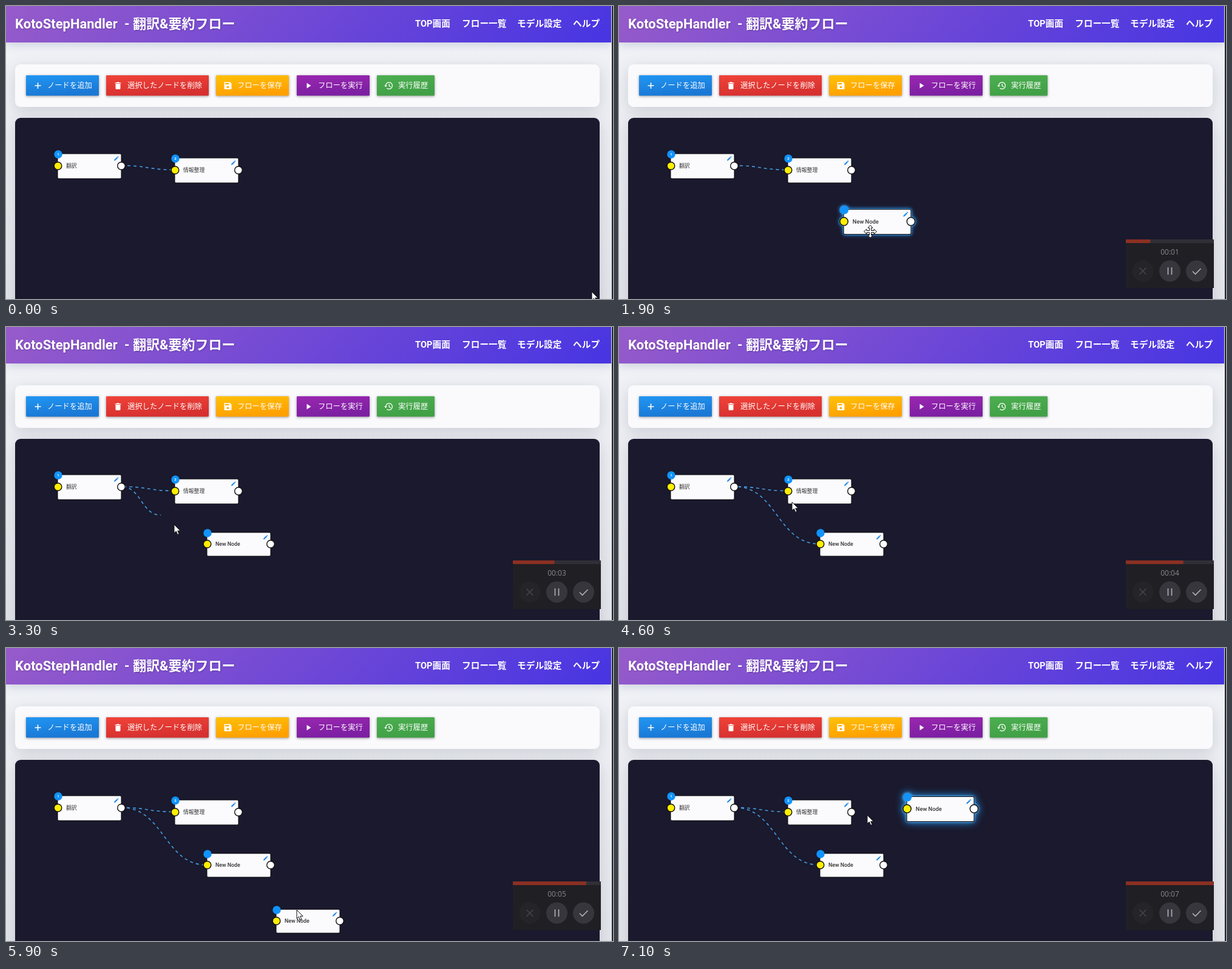
An HTML page for the animation above (7.2 s loop, 1000x482 px).

```html
<!DOCTYPE html>
<html lang="ja">
<head>
<meta charset="utf-8">
<title>フローエディター</title>
<style>
  html, body { margin: 0; width: 100%; height: 100%; overflow: hidden; background: #eceef3; }
  svg { display: block; width: 100vw; height: 100vh; }
  text { font-family: Roboto, "Noto Sans CJK JP", "Noto Sans CJK", sans-serif; fill: #fff; white-space: pre; }
  .title { font-size: 22px; font-weight: 700; text-shadow: 1px 1px 3px #0003; }
  .nav { font-size: 14.7px; font-weight: 700; }
  .button { font-size: 12.3px; font-weight: 500; }
  .tip { font-size: 12.9px; text-anchor: middle; }
  .label { font-size: 8.8px; font-weight: 500; fill: #333; }
  .badge { font-size: 6px; font-weight: 700; text-anchor: middle; }
  .clock { font: 12px "Open Sans", sans-serif; text-anchor: middle; fill: #89888c; }
  .link { fill: none; stroke: #459be0; stroke-width: 1.6; stroke-dasharray: 5 5; }
  .line { fill: none; stroke: #fff; stroke-width: 1.6; }
  .soft { filter: drop-shadow(0 6px 12px #1f263828); }
  .raised { filter: drop-shadow(0 1px 2px #0006); }
  .cursor { fill: #fff; stroke: #111; stroke-width: 1; stroke-linejoin: round; }
</style>
</head>
<body>
<svg viewBox="0 0 1000 482">
  <defs>
    <linearGradient id="header" gradientUnits="userSpaceOnUse" x2="528" y2="528">
      <stop stop-color="#975bca"/><stop offset="1" stop-color="#4735e2"/>
    </linearGradient>
    <linearGradient id="page" x2="0" y2="1">
      <stop stop-color="#f2f4f8"/><stop offset="1" stop-color="#e3e5eb"/>
    </linearGradient>
  </defs>
  <rect width="1000" height="482" fill="url(#page)"/>
  <rect width="997" height="60" fill="url(#header)" style="filter:drop-shadow(0 3px 8px #3a4a8038)"/>
  <text class="title" x="15" y="37">KotoStepHandler</text>
  <text class="title" x="195" y="37">- 翻訳&amp;要約フロー</text>
  <g id="nav"></g>
  <rect class="soft" x="15" y="96" width="963" height="70" rx="9" fill="#fafafd"/>
  <g id="buttons"></g>
  <rect class="soft" x="15" y="184" width="963" height="320" rx="9" fill="#1a192d"/>
  <rect x="998" width="2" height="482" fill="#25242b"/>
  <g id="links"></g>
  <g id="nodes"></g>
  <g id="recorder">
    <rect x="835" y="384" width="145" height="80" fill="#201f24"/>
    <rect x="835" y="384" width="145" height="6" fill="#312f36"/>
    <rect id="progress" x="835" y="384" height="6" fill="#8b3022"/>
    <text id="clock" class="clock" x="907.5" y="409"></text>
    <circle cx="863" cy="436" r="17.5" fill="#252429"/>
    <circle cx="907.5" cy="436" r="17.5" fill="#38363d"/>
    <circle cx="951.5" cy="436" r="17.5" fill="#38363d"/>
    <path class="line" d="M857.5 430.5l11 11m0-11l-11 11" style="stroke:#454449"/>
    <path class="line" d="M904.5 430v12m6-12v12M945 436.5l4.500 4.500 9-9" style="stroke:#b4b3b8"/>
  </g>
  <g id="tooltip">
    <path d="M138 106h10l-5 5z" fill="#555558"/>
    <rect x="6" y="34" width="275" height="72" rx="4" fill="#555558"/>
    <text class="tip" x="143" y="56">新しいノードをフローに追加します。</text>
    <text class="tip" x="143" y="74.500">各ノードはマウス操作で連結できます。</text>
    <text class="tip" x="143" y="92.500">1つのノードのみ先行条件にできます。</text>
  </g>
  <g id="pointer" class="cursor">
    <path id="arrow" d="M0 0v14l3.300-3 2.400 5.500 2.400-1-2.400-5.300h4.500z"/>
    <g id="hand">
      <path d="M-1.500 1q1.500-2 3 0v6l7 1.500q2 .5 1.700 3l-1.200 7.500h-8.500l-6-7q.8-2 3-.5l1 1z"/>
      <path d="M4 8v3m3-2.500v3" fill="none"/>
    </g>
    <path id="move" d="M0-10.500l4 4.500h-2.500v4.500h4.500v-2.500l4.500 4-4.500 4v-2.500h-4.500v4.500h2.500l-4 4.500-4-4.500h2.500v-4.500h-4.500v2.500l-4.500-4 4.500-4v2.500h4.500v-4.500h-2.500z"/>
  </g>
</svg>
<script>
const LOOP = 7200, STEP = 100;
const $ = id => document.getElementById(id);
const show = (el, on) => el.style.display = on ? '' : 'none';

const NAV = [[674, 'TOP画面'], [751, 'フロー一覧'], [842, 'モデル設定'], [934, 'ヘルプ']];
$('nav').innerHTML = NAV.map(([x, s]) => `<text class="nav" x="${x}" y="34">${s}</text>`).join('');

// Icons are drawn around their own centre.
const ICONS = {
  add: '<path class="line" d="M-5 0h10M0-5v10"/>',
  trash: '<path fill="#fff" d="M-4-3h8v7.500q0 1.500-1.500 1.500h-5q-1.500 0-1.500-1.500zM-5-5h2.500l1-1h3l1 1H5v1.300H-5z"/>',
  save: '<path fill="#fff" fill-rule="evenodd" d="M-6-5q0-1 1-1h8.500l2.500 2.500v8.500q0 1-1 1h-10q-1 0-1-1zM-4.500-4.500v2.500h6.500v-2.500z"/><circle cy="2.300" r="1.900" fill="#ffad05"/>',
  play: '<path fill="#fff" d="M-3-4.500v9l7-4.500z"/>',
  history: '<path class="line" d="M-5 0a5.500 5.500 0 1 1 2 4.300M.7-3v3.500l3 1.800" style="stroke-width:1.300"/><path fill="#fff" d="M-7.500-.5h5l-2.500 2.800z"/>'
};
const BUTTONS = [
  [33, 120, 'ノードを追加', 'add', '#2196f3', '#1a78d5'],
  [165, 169, '選択したノードを削除', 'trash', '#f04338', '#d63030'],
  [346, 120, 'フローを保存', 'save', '#ffc107', '#ffa000'],
  [479, 120, 'フローを実行', 'play', '#9a27b0', '#7c1fa2'],
  [611, 95, '実行履歴', 'history', '#4caf50', '#41a046']
];
$('buttons').innerHTML = BUTTONS.map(([x, w, text, icon, from, to]) => `
  <linearGradient id="${icon}Fill" x2=".3" y2="1"><stop stop-color="${from}"/><stop offset="1" stop-color="${to}"/></linearGradient>
  <rect id="${icon}" class="raised" x="${x}" y="114" width="${w}" height="33.500" rx="1" fill="url(#${icon}Fill)"/>
  <g transform="translate(${x + 19.5} 131)">${ICONS[icon]}</g>
  <text class="button" x="${x + 35}" y="135">${text}</text>`).join('');

function addNode(label, badge, height) {
  const mid = height / 2 - .5;
  $('nodes').insertAdjacentHTML('beforeend', `<g>
    <rect width="105" height="${height}" rx="2" fill="#fbfbfd" stroke="#08080c"/>
    <circle cy="${mid}" cx=".5" r="6.300" fill="#ffee00" stroke="#111" stroke-width="1.400"/>
    <circle cy="${mid}" cx="105" r="6.300" fill="#fff" stroke="#111" stroke-width="1.400"/>
    <circle cx="1" cy="1" r="6.700" fill="#1193fb"/>
    <text class="badge" x="1" y="3.200">${badge}</text>
    <path d="M93 11.500l.3-1.800 4.500-4.500 1.500 1.500-4.500 4.500zM98.300 4.700l.8-.8 1.500 1.500-.8.8z" fill="#1e88e5"/>
    <text class="label" x="14" y="${mid + 3}">${label}</text></g>`);
  const el = $('nodes').lastElementChild;
  return (x, y, glow = 0) => {
    const scale = 1 + .056 * Math.min(1, glow * 2);
    el.setAttribute('transform', `translate(${x + 52.5} ${y + height / 2}) scale(${scale}) translate(-52.5 ${-height / 2})`);
    el.style.filter = glow ? `drop-shadow(0 0 ${2 * glow}px #6bc3ff) drop-shadow(0 0 ${6 * glow}px #2196f3)` : '';
    return el;
  };
}
function addLink() {
  $('links').insertAdjacentHTML('beforeend', '<path class="link"/>');
  const el = $('links').lastElementChild;
  return (x, y, t) => {
    const mid = (190 + x) / 2;
    el.setAttribute('d', `M190 262.500C${mid} 262.500 ${mid} ${y} ${x} ${y}`);
    el.style.strokeDashoffset = -t / 100;
    return el;
  };
}

// Linear interpolation through [time, ...values] keys.
function along(keys, t) {
  const i = keys.findIndex(k => k[0] > t);
  if (i === 0) return keys[0].slice(1);
  if (i < 0) return keys[keys.length - 1].slice(1);
  const [a, b] = [keys[i - 1], keys[i]], p = (t - a[0]) / (b[0] - a[0]);
  return a.slice(1).map((v, j) => v + (b[j + 1] - v) * p);
}

const POINTER = [
  [0, 965, 470], [700, 133, 128], [1150, 133, 128], [1650, 440, 362], [1700, 440, 362],
  [1900, 414, 371], [2300, 372, 373.5], [2400, 372, 373.5], [2900, 190, 263], [3300, 277, 325],
  [3700, 331, 357], [4100, 331, 357], [4600, 285, 288], [5000, 133, 128], [5300, 133, 128],
  [5900, 479, 431], [6000, 490, 447], [6600, 522, 262.5], [6800, 522, 262.5], [7100, 409, 275]
];
const FIRST_GLOW = [[1600, 0], [1900, .5], [2300, .9], [2500, 0]];
const SECOND_GLOW = [[5900, 0], [6200, .7], [6600, 1]];
const dragged = (t, start, end, dx, dy) => {
  const [x, y] = along(POINTER, Math.min(end, Math.max(start, t)));
  return [x + dx, y + dy];
};
const within = (t, from, to) => t >= from && t < to;

const translateNode = addNode('翻訳', 1, 41), sortNode = addNode('情報整理', 2, 41);
const firstNode = addNode('New Node', '', 39), secondNode = addNode('New Node', '', 39);
const sortLink = addLink(), newLink = addLink();
translateNode(85, 243);
sortNode(278, 250);

function draw(t) {
  const [x, y] = along(POINTER, t);
  const hover = within(t, 700, 1200) || within(t, 5000, 5400);
  const moving = within(t, 1700, 2500) || within(t, 6000, 6900);

  $('pointer').setAttribute('transform', `translate(${x} ${y})`);
  show($('hand'), hover);
  show($('move'), moving);
  show($('arrow'), !hover && !moving);
  show($('tooltip'), hover);
  $('add').style.filter = hover ? 'brightness(1.12) drop-shadow(0 2px 4px #0008)' : '';

  show(firstNode(...dragged(t, 1700, 2300, -41, -35.5), ...along(FIRST_GLOW, t)), t >= 1200);
  show(secondNode(...dragged(t, 6000, 6600, -45, -17), ...along(SECOND_GLOW, t)), t >= 5400);

  sortLink(278, 269.5, t);
  const end = t < 3700 ? along(POINTER, t - STEP) : [331, 357];
  show(newLink(...end, t), t >= 3000);

  show($('recorder'), t >= STEP);
  $('progress').setAttribute('width', 145 * (t + STEP) / LOOP);
  $('clock').textContent = '00:0' + Math.floor(t / 1000);
}

const began = performance.now();
function tick() {
  const t = (performance.now() - began) % LOOP;
  draw(Math.floor(t / STEP) * STEP);
  requestAnimationFrame(tick);
}
tick();
</script>
</body>
</html>
```
